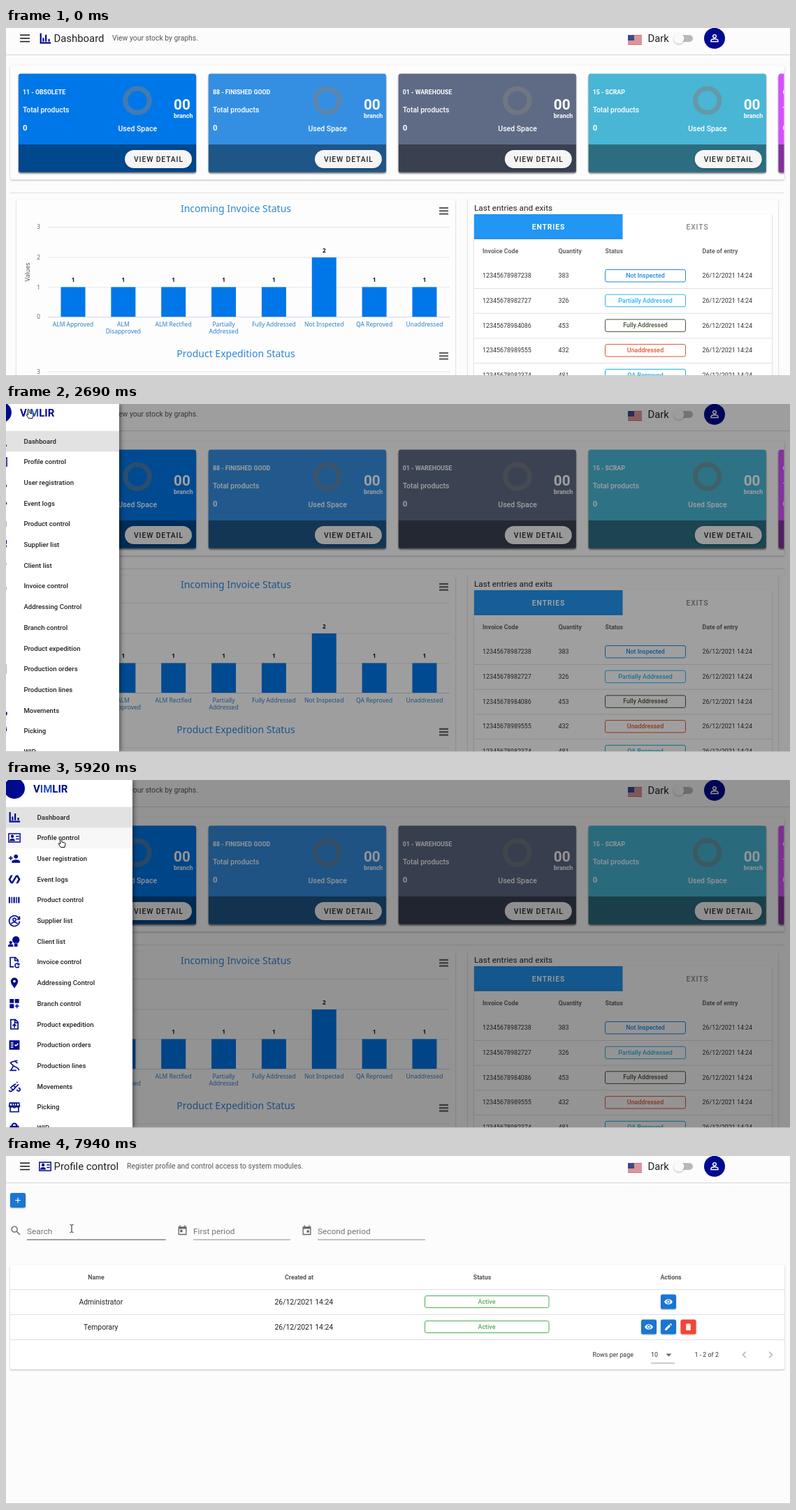
An HTML page that plays this animation: 1122 px wide and 499 px high, repeating every 8 s.

```html
<!DOCTYPE html>
<html lang="en">
<head>
<meta charset="utf-8">
<title>Stock dashboard</title>
<style>
html, body { margin: 0; width: 100%; height: 100%; overflow: hidden; background: #fcfcfc; }
svg { display: block; width: 1122px; height: 499px; font-family: Roboto, sans-serif; }
.chart { font-family: "Noto Sans", "Open Sans", sans-serif; }
.paper { filter: drop-shadow(0 1px 1px #0004); }
.card { filter: drop-shadow(0 2px 1px #0009); }
</style>
</head>
<body>
<svg id="stage" viewBox="0 0 1122 499"></svg>
<script>
const LOOP = 8000, NAVY = '#000a8f', BLUE = '#0077e8', GREY = '#757575';
const DRAWER = 181, ROW = 29.7, ROW_TOP = 38.7;

// ---- drawing helpers ----
const text = (x, y, s, size = 8.9, fill = '#333', extra = '') =>
  `<text x="${x}" y="${y}" font-size="${size}" fill="${fill}" ${extra}>${s}</text>`;
const rect = (x, y, w, h, fill, extra = '') =>
  `<rect x="${x}" y="${y}" width="${w}" height="${h}" fill="${fill}" ${extra}/>`;
const line = (x1, y1, x2, y2, color = '#e0e0e0', width = 1) =>
  `<path d="M${x1} ${y1}L${x2} ${y2}" stroke="${color}" stroke-width="${width}" fill="none"/>`;
const group = (id, body, extra = '') => `<g id="${id}" ${extra}>${body}</g>`;
const MID = 'text-anchor="middle"', MEDIUM = 'font-weight="500"', BOLD = 'font-weight="700"';
const burger = (x, y, w, gap, thick, color) =>
  [-1, 0, 1].map(i => line(x, y + i * gap, x + w, y + i * gap, color, thick)).join('');

// Icons on a 24-unit grid: f = filled path, s = stroked path
const ICONS = {
  bars: { f: 'M2 2h3v17h18v3H2zM7 11h3v7H7zM12 5h3v13h-3zM18 13h3v5h-3z' },
  card: { f: 'M0 3h24v18H0zM2 5v14h20V5zM8 6a3 3 0 1 0 .1 0zM2.5 18c0-6 11-6 11 0zM15 8h6v2h-6zM15 13h6v2h-6z' },
  addUser: { f: 'M15 4a4 4 0 1 0 .1 0zM4 7h2v3h3v2H6v3H4v-3H1v-2h3zM7 20v-2c0-5.300 16-5.300 16 0v2z' },
  logs: { f: 'M19 4h-4L7.100 16.600 4.500 12 9 4H5L.5 12 5 20h4l7.900-12.600L19.500 12 15 20h4l4.500-8z' },
  stripes: { f: 'M1 6h3v12H1zM6 6h2v12H6zM10 6h3v12h-3zM15 6h2v12h-2zM19 6h3v12h-3z' },
  supplier: { s: 'M21 8A10 10 0 1 0 22 13M22 3v6h-5M12 7a3 3 0 1 0 .1 0M6 18c2-4 10-4 12 0' },
  client: { f: 'M15 2a7 7 0 1 0 .1 0zM5 11a3 3 0 1 0 .1 0zM0 22v-2c0-4 10-4 10 0v2zM12 15h6v7h-6z' },
  invoice: { s: 'M11 21H4V3h10l5 5v4M13 3v6h6M21 17a4 4 0 1 0 0 3M21 14v3h-3' },
  pin: { f: 'M12 2C8 2 5 5 5 9c0 5.200 7 13 7 13s7-7.800 7-13c0-4-3-7-7-7zM12 6.500a2.500 2.500 0 1 1-.1 0z' },
  branch: { f: 'M3 3h8v8H3zM13 3h8v8h-8zM3 13h8v8H3zM16 13h2v3h3v2h-3v3h-2v-3h-3v-2h3z' },
  expedition: { s: 'M5 3h9l5 5v13H5zM13 3v6h6M12 19v-7M8.500 15l3.500-3.500 3.500 3.500' },
  orders: { f: 'M2 3h20v18H2zM5 7v2h5V7zM5 11v2h5v-2zM5 15v2h5v-2zM12 12l3 3 5-5-1.500-1.500-3.500 3.500-1.500-1.500z' },
  arm: { s: 'M3 21h13M6 20l4-8M10 12L4 6M4 6l9-3M13 3l5-1M13 3l5 4M10 12l9 5M19 17l2 4' },
  move: { s: 'M2 19a3 3 0 1 0 4-3M20 15a3 3 0 1 1-3 3M4 15l6-5 4 4 6-6M10 10l5-3M17 3v2M9 20l5-6' },
  shop: { s: 'M3 4h18l1 6H2zM4 11v10h16V11M8 4v6M12 4v6M16 4v6M2 10c2 4 5 2 6 0 2 4 6 4 8 0 1 3 5 3 6 0' },
  bag: { f: 'M6 8a6 6 0 0 1 12 0h3l-2 14H5L3 8zM9 8h6a3 3 0 0 0-6 0z' },
  person: { s: 'M12 4.500a3.500 3.500 0 1 0 .1 0zM4.500 19.500v-2c0-5 15-5 15 0v2z' },
  search: { s: 'M9.500 4a5.500 5.500 0 1 0 .1 0zM14 14l6 6' },
  calendar: { f: 'M3 4h3V1h2v3h8V1h2v3h3v18H3zM5 9v11h14V9zM12 12h5v5h-5z' },
  calendarStart: { f: 'M3 4h3V1h2v3h8V1h2v3h3v18H3zM5 9v11h14V9zM7 11h5v5H7z' },
  eye: { f: 'M1 12C5 2.500 19 2.500 23 12 19 21.500 5 21.500 1 12zM12 7a5 5 0 1 0 .1 0zM12 9a3 3 0 1 1-.1 0z' },
  pencil: { f: 'M3 17L14 6l4 4L7 21H3zM15.500 4.500L18 2.500 21.500 6 19.500 8.500z' },
  trash: { f: 'M6 7h12v14H6zM5 4h4l1-1h4l1 1h4v2H5z' },
  plus: { s: 'M12 5v14M5 12h14' },
  prev: { s: 'M15 5l-7 7 7 7' },
  next: { s: 'M9 5l7 7-7 7' }
};
function icon(name, cx, cy, size, color) {
  const { f, s } = ICONS[name], k = size / 24;
  const paint = f ? `fill="${color}" fill-rule="evenodd"` : `fill="none" stroke="${color}" stroke-width="2.200"`;
  return `<path transform="translate(${cx - size / 2} ${cy - size / 2}) scale(${k})" d="${f || s}" ${paint}/>`;
}

// ---- top bar ----
const pageTitle = (id, glyph, title, hint, hintX) => group(id,
  icon(glyph, 56, 15, 17.800, NAVY) + text(68.500, 19.800, title, 14.900, '#222') + text(hintX, 18, hint, 10.360, '#555'));

function topBar() {
  const stripes = [...Array(7)].map((_, i) => rect(890, 10 + i * 2.150, 20, 1.100, '#c8414b')).join('');
  return rect(0, 0, 1122, 38, '#fcfcfc') + line(0, 38.500, 1122, 38.500, '#d6d6d6') +
    burger(20, 14.800, 14, 4.700, 1.600, '#222') +
    pageTitle('titleDash', 'bars', 'Dashboard', 'View your stock by graphs.', 152) +
    pageTitle('titleProfile', 'card', 'Profile control', 'Register profile and control access to system modules.', 173) +
    rect(890, 10, 20, 15, '#eee') + stripes + rect(890, 10, 9, 8, '#3c4a86') +
    text(918.500, 19.800, 'Dark', 14.800, '#222') +
    rect(958, 10, 25, 10, '#b9b9b9', 'rx="5"') +
    '<circle class="paper" cx="963" cy="15" r="7.500" fill="#fafafa"/>' +
    `<circle cx="1014" cy="14.800" r="15" fill="${NAVY}"/>` + icon('person', 1014, 14.500, 16, '#fff') +
    '<circle id="burgerRipple" cx="27" cy="15" fill="#000"/>';
}

// ---- dashboard ----
function stockCard([name, color], i) {
  const x = 18 + i * 271.900;
  return `<g class="card">${rect(x, 65.500, 254, 141, color, 'rx="3"')}</g>` + rect(x, 167, 254, 39.500, '#0006') +
    text(x + 6, 95, name, 8.800, '#fff', BOLD) +
    text(x + 6, 121, 'Total products', 10.360, '#fff', MEDIUM) +
    text(x + 6, 146.500, '0', 11.500, '#fff', BOLD) +
    `<circle cx="${x + 170}" cy="104" r="17.300" fill="none" stroke="#80808088" stroke-width="7"/>` +
    text(x + 222, 117, '00', 20.800, '#fff', BOLD) + text(x + 222, 128.500, 'branch', 8.900, '#fff', BOLD) +
    text(x + 142.500, 148, 'Used Space', 10.500, '#fff', MEDIUM) +
    `<g class="paper">${rect(x + 152, 175, 96, 26, '#f5f5f5', 'rx="13"')}</g>` +
    text(x + 165, 192, 'VIEW DETAIL', 10.360, '#222', MEDIUM + ' letter-spacing=".9"');
}

function chart() {
  const labels = ['ALM Approved', 'ALM|Disapproved', 'ALM Rectfied', 'Partially|Addressed',
    'Fully Addressed', 'Not Inspected', 'QA Reproved', 'Unaddressed'];
  const title = (s, y) => text(329, y, s, 14, '#2f86d6', MID) + burger(620, y - 1.200, 13, 4.300, 2.300, '#666');
  let out = title('Incoming Invoice Status', 263.500) + title('Product Expedition Status', 471.500);
  [285, 328.500, 371.500, 414].forEach((y, i) => {
    out += line(60, y + .5, 635, y + .5, i == 3 ? '#ccd6eb' : '#e6e6e6') + text(49, y + 3, 3 - i, 8.200, '#666', 'text-anchor="end"');
  });
  out += line(60, 493, 635, 493, '#e6e6e6') + text(49, 496, 3, 8.200, '#666', 'text-anchor="end"');
  out += text(0, 0, 'Values', 8.900, '#555', MID + ' transform="translate(34 350) rotate(-90)"');
  labels.forEach((label, i) => {
    const x = 96 + i * 71.850, value = i == 5 ? 2 : 1, h = value * 42.500;
    out += rect(x - 17.500, 414 - h, 35, h, BLUE) + text(x, 408 - h + (value - 1) * 0, '', 8) +
      text(x, 408.500 - h - 2, value, 8.200, '#111', MID + ' ' + BOLD);
    label.split('|').forEach((part, j) => out += text(x, 428 + j * 10.300, part, 8.500, '#2f7fc8', MID));
  });
  return `<g class="chart">${out}</g>`;
}

function entriesTable() {
  const rows = [
    ['12345678987238', 383, 'Not Inspected', '#2088e5'], ['12345678982727', 326, 'Partially Addressed', '#2fb4ea'],
    ['12345678984086', 453, 'Fully Addressed', '#46533a'], ['12345678989555', 432, 'Unaddressed', '#e0562f'],
    ['12345678982374', 481, 'QA Reproved', '#12b0dc']];
  const tab = MID + ' ' + BOLD + ' letter-spacing=".9"';
  let out = text(670, 262, 'Last entries and exits', 11.840, '#222') +
    `<g class="paper">${rect(670, 267, 426, 240, '#fff')}</g>` +
    rect(670, 267, 212.500, 35.500, '#2196f3') + line(670, 302, 882.500, 302, '#1976d2') +
    text(776.500, 288.800, 'ENTRIES', 10.360, '#fff', tab) + text(989.500, 288.800, 'EXITS', 10.360, '#858585', tab.replace(BOLD, MEDIUM));
  [[682, 'Invoice Code'], [790.500, 'Quantity'], [857.500, 'Status'], [996.500, 'Date of entry']]
    .forEach(([x, s]) => out += text(x, 322.800, s, 8.800, '#666', BOLD));
  rows.forEach(([code, amount, status, color], i) => {
    const y = 355 + i * 35.700;
    out += text(682, y + 3.200, code) + text(790.500, y + 3.200, amount) + text(996.500, y + 3.200, '26/12/2021 14:24') +
      rect(857.500, y - 8.500, 115, 17.500, 'none', `rx="2.500" stroke="${color}"`) +
      text(915, y + 3, status, 8.900, color, MID + ' ' + MEDIUM) + line(670, y + 18.500, 1096, y + 18.500);
  });
  return out;
}

function dashboard() {
  const cards = [['11 - OBSOLETE', BLUE], ['88 - FINISHED GOOD', '#348fe2'], ['01 - WAREHOUSE', '#5f6b85'],
    ['15 - SCRAP', '#49b6d6'], ['6', '#d64fff']];
  return `<g class="paper">${rect(6, 53.500, 1108, 164, '#fdfdfd', 'rx="3"')}</g>` +
    `<g clip-path="url(#cardClip)">${cards.map(stockCard).join('')}</g>` + line(6, 236.500, 1114, 236.500) +
    `<g class="paper">${rect(15, 246, 628, 270, '#fdfdfd', 'rx="3"')}${rect(661, 246, 444, 270, '#fdfdfd', 'rx="3"')}</g>` +
    chart() + entriesTable();
}

// ---- profile page ----
function profilePage() {
  const button = (x, y, glyph, color = '#1976d2') =>
    `<g class="paper">${rect(x, y, 22, 21, color, 'rx="2.500"')}</g>` + icon(glyph, x + 11, y + 10.500, 13, '#fff');
  const field = (label, x, end, id) =>
    text(x, 111.500, label, 11.840, GREY) + `<path id="${id}" d="M${x} 120H${end}" stroke="#8a8a8a"/>`;
  let out = button(6, 53, 'plus') + icon('search', 14, 107, 18, GREY) + icon('calendarStart', 252.500, 106.500, 16, '#666') +
    icon('calendar', 430.500, 106.500, 16, '#666') +
    field('Search', 30, 228.500, 'searchLine') + field('First period', 268, 407, 'firstLine') + field('Second period', 446, 600, 'secondLine') +
    `<g class="paper">${rect(6, 156, 1108, 150, '#fff', 'rx="3"')}</g>`;
  [[129, 'Name'], [419.500, 'Created at'], [681.500, 'Status'], [951.500, 'Actions']]
    .forEach(([x, s]) => out += text(x, 176.500, s, 8.800, '#555', MID + ' ' + BOLD));
  ['Administrator', 'Temporary'].forEach((name, i) => {
    const y = 209 + i * 36;
    out += line(6, y - 17.500, 1114, y - 17.500) + text(135.800, y + 3.800, name, 10.360, '#222', MID) +
      text(426.300, y + 3.800, '26/12/2021 14:24', 10.360, '#222', MID) +
      rect(599.500, y - 8.500, 177.500, 17, 'none', 'rx="2.500" stroke="#4caf50"') +
      text(688, y + 3, 'Active', 8.900, '#4caf50', MID + ' ' + MEDIUM);
  });
  return out + line(6, 263.500, 1114, 263.500) + button(937, 198.500, 'eye') +
    button(909, 234.500, 'eye') + button(937, 234.500, 'pencil') + button(965.500, 234.500, 'trash', '#f44336') +
    text(839.500, 288.200, 'Rows per page') + text(923, 288.200, '10') + line(923, 297, 957, 297, '#999') +
    '<path d="M944.500 283.500h8l-4 4z" fill="#666"/>' + text(985.500, 288.200, '1 - 2 of 2') +
    icon('prev', 1057, 285, 15, '#aaa') + icon('next', 1094, 285, 15, '#aaa');
}

// ---- drawer ----
function drawer() {
  const items = [['bars', 'Dashboard'], ['card', 'Profile control'], ['addUser', 'User registration'], ['logs', 'Event logs'],
    ['stripes', 'Product control'], ['supplier', 'Supplier list'], ['client', 'Client list'], ['invoice', 'Invoice control'],
    ['pin', 'Addressing Control'], ['branch', 'Branch control'], ['expedition', 'Product expedition'], ['orders', 'Production orders'],
    ['arm', 'Production lines'], ['move', 'Movements'], ['shop', 'Picking'], ['bag', 'WIP']];
  return `<g style="filter:drop-shadow(2px 0 3px #0007)">${rect(-10, 0, DRAWER + 10, 499, '#fff')}</g>` +
    rect(0, ROW_TOP, DRAWER, ROW, '#000', 'id="selected"') +
    rect(0, 0, DRAWER, ROW, '#000', 'id="hover"') +
    `<circle id="itemRipple" cx="80" cy="83" fill="#000" clip-path="url(#rowClip)"/>` +
    `<circle cx="12" cy="12" r="15" fill="${NAVY}"/>` +
    text(39, 17.500, 'V<tspan fill="#2a56c0">IM</tspan>LIR', 15, NAVY, BOLD) +
    items.map(([glyph, label], i) => {
      const y = 53.300 + i * ROW;
      return icon(glyph, 12, y, 17.800, NAVY) + text(44.500, y + 3.200, label, 9.620, '#222', MEDIUM);
    }).join('');
}

// ---- pointers, centred on their own origin ----
const pointers =
  group('arrow', '<path d="M-4-7v12l2.800-2.600 2 4.400 1.800-.8-2-4.300h4z" fill="#fff" stroke="#111" stroke-width=".9"/>') +
  group('hand', '<path d="M-2.500 2v-7q1.200-2.200 2.300 0v4l4 .8q1.400.4 1.200 2L4 6.500h-5.500L-5 1.500q.3-1.500 1.500-.5z" fill="#fff" stroke="#111"/>') +
  group('beam', '<path d="M-2.500-5.500q2 0 2.500 1 .5-1 2.500-1M0-4.500v9M-2.500 5.500q2 0 2.500-1 .5 1 2.500 1" fill="none" stroke="#222"/>');

document.getElementById('stage').innerHTML =
  `<clipPath id="cardClip"><rect x="6" y="50" width="1107.500" height="170"/></clipPath>
   <clipPath id="rowClip"><rect x="0" y="${ROW_TOP + ROW}" width="${DRAWER}" height="${ROW}"/></clipPath>` +
  rect(0, 0, 1122, 499, '#fcfcfc') + group('dash', dashboard()) + group('profile', profilePage()) + topBar() +
  rect(0, 0, 1122, 499, '#000', 'id="scrim"') + group('drawer', drawer()) +
  line(0, 498.500, 1122, 498.500, '#c4c4c4') + group('pointer', pointers);

// ---- motion ----
const el = id => document.getElementById(id);
const set = (id, attrs) => { for (const k in attrs) el(id).setAttribute(k, attrs[k]); };
const show = (id, on) => set(id, { display: on ? 'inline' : 'none' });
const span = (t, from, to) => Math.min(1, Math.max(0, (t - from) / (to - from)));
const easeOut = p => 1 - (1 - p) ** 3;
const smooth = p => p * p * (3 - 2 * p);

// time, x, y
const PATH = [[280, 1026, 490], [480, 475, 208], [740, 473, 206], [880, 209, 139], [1140, 207, 137], [1670, 34, 14],
  [3230, 34, 14], [3620, 36, 92], [4030, 22, 488], [4100, 20, 486], [4860, 112, 96], [4920, 110, 96], [5060, 80, 90],
  [7600, 80, 90], [7760, 62, 66], [7940, 94, 104]];

function pointerAt(t) {
  const i = PATH.findIndex(([time]) => time > t);
  if (i < 1) return PATH[i ? PATH.length - 1 : 0].slice(1);
  const [t0, x0, y0] = PATH[i - 1], [t1, x1, y1] = PATH[i], p = smooth(span(t, t0, t1));
  return [x0 + (x1 - x0) * p, y0 + (y1 - y0) * p];
}

function render(t) {
  const [x, y] = pointerAt(t), navigated = t >= 6460;

  const open = t < 4000 ? easeOut(span(t, 2480, 2880)) : 1 - smooth(span(t, 6550, 6775));
  show('drawer', open > 0);
  set('drawer', { transform: `translate(${DRAWER * (open - 1)} 0)` });
  set('scrim', { opacity: .42 * open });

  const row = Math.floor((y - 6 - ROW_TOP) / ROW);
  show('hover', row >= 0 && t > 3230);
  set('hover', { y: ROW_TOP + row * ROW, opacity: row ? .03 : .06 });
  set('selected', { y: ROW_TOP + (navigated ? ROW : 0), opacity: .115 });
  const press = span(t, 5920, 6350);
  set('itemRipple', { r: 110 * easeOut(press), opacity: press ? .18 : 0 });
  const tap = span(t, 2190, 2450);
  set('burgerRipple', { r: 17 * easeOut(tap), opacity: tap ? .12 * (1 - span(t, 2480, 2800)) : 0 });

  show('titleDash', !navigated);
  show('titleProfile', navigated);
  const leave = span(t, 6455, 6895), enter = span(t, 6900, 7400);
  show('dash', leave < 1);
  set('dash', { opacity: 1 - leave, transform: `translate(${-10.700 * leave} 0)` });
  show('profile', enter > 0);
  set('profile', { opacity: enter, transform: `translate(${10 * (1 - enter)} 0)` });

  const inSearch = t > 7600 && y > 95;
  set('searchLine', { stroke: inSearch ? '#444' : '#8a8a8a' });
  const kind = inSearch ? 'beam' : t < 1560 || t > 7600 ? 'arrow' : 'hand';
  ['arrow', 'hand', 'beam'].forEach(id => show(id, id == kind));
  show('pointer', t >= 280);
  set('pointer', { transform: `translate(${x} ${y})` });
}

const start = performance.now();
function tick() {
  render((performance.now() - start) % LOOP);
  requestAnimationFrame(tick);
}
tick();
</script>
</body>
</html>
```
